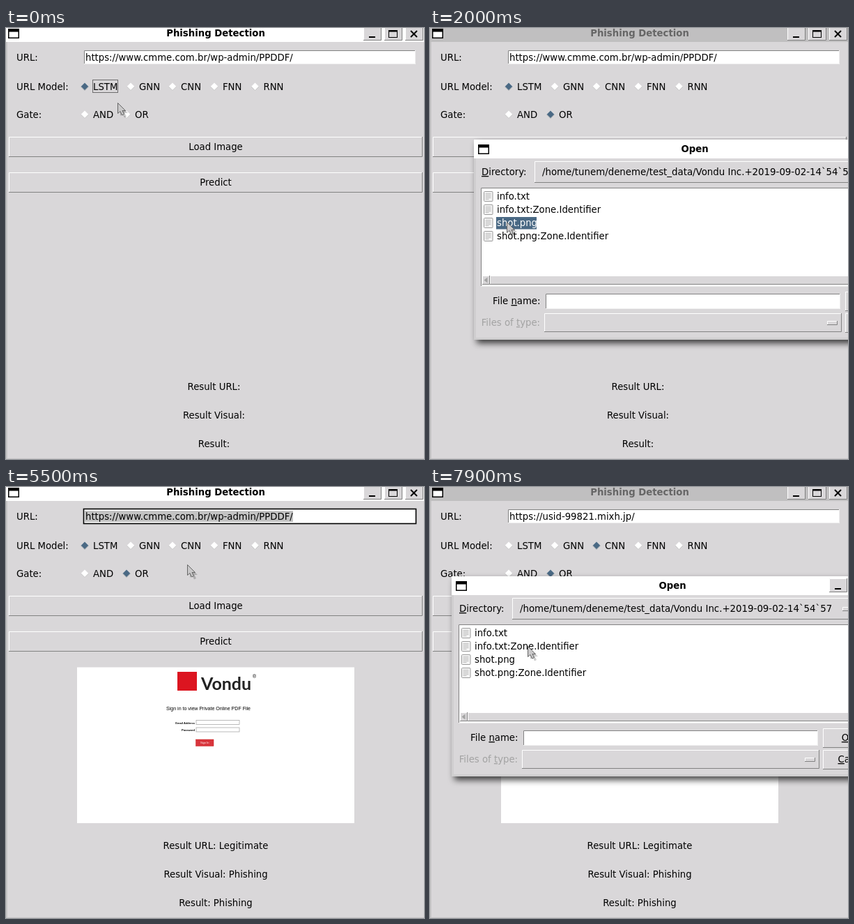
Recreate the animation shown at these times as an HTML page. Size 600x618 px, loop 8000 ms.

```html
<!DOCTYPE html>
<html lang="en">
<head>
<meta charset="utf-8">
<title>Phishing Detection</title>
<style>
  html, body { margin: 0; width: 100%; height: 100%; overflow: hidden; background: #d9d7d9; }
  #stage { display: block; width: 600px; height: 618px; }
  text { font: 13.25px "DejaVu Sans", sans-serif; fill: #000; white-space: pre; }
  .title { font-weight: bold; }
  .path { font-size: 13.35px; }
  .folder { font-size: 13.5px; }
  .mid { text-anchor: middle; }
  .end { text-anchor: end; }
  .u { text-decoration: underline; }
  .off { fill: #a3a3a3; }
  .shadow { filter: drop-shadow(4px 5px 5px #000b); }
  .page { font-family: "Liberation Sans", sans-serif; }
</style>
</head>
<body>
<svg id="stage" viewBox="0 0 600 618"></svg>
<script>
const LOOP = 8000, STEP = 100;
const GREY = '#d9d7d9', BLUE = '#4a6984';
const stage = document.getElementById('stage');
const timed = [];

function el(parent, tag, attrs = {}) {
  const node = document.createElementNS('http://www.w3.org/2000/svg', tag);
  for (const key in attrs) node.setAttribute(key, attrs[key]);
  return parent.appendChild(node);
}
const group = (p, attrs) => el(p, 'g', attrs);
const rect = (p, x, y, width, height, fill, more) =>
  el(p, 'rect', { x, y, width, height, fill, ...more });
const line = (p, d, stroke, width = 1) =>
  el(p, 'path', { d, stroke, 'stroke-width': width, fill: 'none' });

// "&" underlines the letter after it.
function text(p, x, y, str, cls = '', style = '') {
  const node = el(p, 'text', { x, y, class: cls, style });
  const at = str.indexOf('&');
  if (at < 0) {
    node.textContent = str;
  } else {
    node.append(str.slice(0, at));
    el(node, 'tspan', { class: 'u' }).textContent = str[at + 1];
    node.append(str.slice(at + 2));
  }
  return node;
}

// Shows a node only inside the given [from, to) spans.
function during(node, ...spans) {
  timed.push({ node, spans });
  return node;
}

function bevel(p, x, y, w, h, fill = GREY, sunken = false) {
  rect(p, x, y, w, h, fill);
  const [lit, dark] = sunken ? ['#828282', '#eee'] : ['#fff', '#828282'];
  line(p, `M${x + .5} ${y + h}V${y + .5}H${x + w}`, lit);
  line(p, `M${x} ${y + h - .5}H${x + w - .5}V${y}`, dark);
}

function windowIcon(p, x, y) {
  rect(p, x + .75, y + .75, 14.5, 12.5, '#fff', { stroke: '#000', 'stroke-width': 1.5 });
  rect(p, x, y, 16, 4.5, '#000');
}

function windowButtons(p, right, y) {
  for (let i = 0; i < 3; i++) bevel(p, right - 92 + i * 30, y, 26, 20);
  line(p, `M${right - 84} ${y + 15}h9`, '#000', 2);
  rect(p, right - 55.5, y + 5.5, 12, 10, 'none', { stroke: '#000' });
  line(p, `M${right - 55} ${y + 6.5}h11`, '#000', 2);
  line(p, `M${right - 24} ${y + 6}l9 9m0 -9l-9 9`, '#000', 2);
}

function diamond(p, x, y, fill) {
  el(p, 'path', { d: `M${x - 5.5} ${y}l5.5 -5.5 5.5 5.5 -5.5 5.5z`, fill });
  line(p, `M${x - 5.5} ${y}l5.5 5.5 5.5 -5.5`, '#bdbdbd', .8);
}

function radio(x, y, label, ...spans) {
  diamond(stage, x, y, '#fff');
  if (spans.length) diamond(during(group(stage), ...spans), x, y, BLUE);
  text(stage, x + 12, y + 5, label);
}

const ring = (x, y, w, ...spans) =>
  during(rect(stage, x + .5, y + .5, w, 18, 'none',
    { stroke: '#000', 'stroke-dasharray': '1 1' }), ...spans);

function wideButton(y, label, hover, press) {
  bevel(stage, 4, y, 594, 29);
  bevel(during(group(stage), ...hover), 4, y, 594, 29, '#ececec');
  if (press) bevel(during(group(stage), press), 4, y, 594, 29, '#ececec', true);
  text(stage, 301, y + 19, label, 'mid');
}

function mainWindow() {
  rect(stage, 0, 0, 600, 618, GREY);
  rect(stage, 0, 0, 2, 618, '#c6c5c6');
  rect(stage, 0, 617, 600, 1, '#c6c5c6');
  rect(stage, 0, 0, 600, 20, '#fff');
  text(stage, 301, 12, 'Phishing Detection', 'title mid');
  const idle = during(group(stage), [800, 2100], [7600, LOOP]);
  rect(idle, 0, 0, 600, 20, '#c0bfc0');
  text(idle, 301, 12, 'Phishing Detection', 'title mid', 'fill:#666');
  windowIcon(stage, 3, 1);
  windowButtons(stage, 605, -2);

  text(stage, 15, 47, 'URL:');
  bevel(stage, 112, 32, 476, 20, '#fff', true);
  during(rect(stage, 111.5, 31.5, 477, 21, '#fff',
    { stroke: '#000', 'stroke-width': 1.6 }), [4900, 6900]);
  during(rect(stage, 113, 34, 299, 16, '#c3c3c3'), [4900, 5900]);
  during(text(stage, 114, 47, 'https://www.cmme.com.br/wp-admin/PPDDF/'), [0, 5900]);
  during(text(stage, 114, 47, 'https://usid-99821.mixh.jp/'), [5900, LOOP]);
  during(rect(stage, 295.5, 34, 1.5, 16, '#000'), [5900, 6900]);

  text(stage, 15, 89, 'URL Model:');
  radio(113, 84, 'LSTM', [0, 6900]);
  radio(179, 84, 'GNN');
  radio(239, 84, 'CNN', [6900, LOOP]);
  radio(299, 84, 'FNN');
  radio(357.5, 84, 'RNN');
  text(stage, 15, 129, 'Gate:');
  radio(113, 124, 'AND');
  radio(173, 124, 'OR', [300, LOOP]);
  ring(124, 74, 36, [0, 300]);
  ring(183, 115, 22, [300, 800], [2100, 4900]);
  ring(250, 74, 30, [6900, 7600]);

  wideButton(156, 'Load Image', [[500, 800], [7300, 7600]]);
  wideButton(207, 'Predict', [[2300, 4800]], [2600, 3800]);

  const rows = [['Result URL:', ' Legitimate'], ['Result Visual:', ' Phishing'], ['Result:', ' Phishing']];
  rows.forEach(([label, value], i) => {
    const y = 519 + i * 41;
    during(text(stage, 298.5, y, label, 'mid'), [0, 3800]);
    during(text(stage, 301, y, label + value, 'mid'), [3800, LOOP]);
  });
}

function loadedPage() {
  const p = during(group(stage), [2100, LOOP]);
  const page = (x, y, str, size, more = '', cls = '') =>
    text(p, x, y, str, 'page ' + cls, `font-size:${size}px;${more}`);
  rect(p, 102, 258.5, 398, 223.5, '#fff');
  rect(p, 246, 265, 28, 27, '#dc1520');
  page(280, 291, 'Vondu', 25, 'font-family:Lato,sans-serif;font-weight:bold;fill:#222');
  page(354, 274, '®', 7);
  page(230, 320, 'Sign in to view Private Online PDF File', 7.05);
  page(271, 339.5, 'Email Address', 4, 'font-weight:bold', 'end');
  page(271, 350, 'Password', 4, 'font-weight:bold', 'end');
  for (const y of [334.5, 345]) rect(p, 273, y, 62, 6, '#fff', { stroke: '#aaa', 'stroke-width': .8 });
  rect(p, 272.5, 362, 25.5, 9.5, '#d8353c', { stroke: '#c22', 'stroke-width': .5 });
  page(285.2, 368.2, 'Sign In', 4, 'fill:#fff', 'mid');
}

function folderIcon(p, x, y) {
  el(p, 'path', { d: `M${x} ${y + 14}v-12h6l2 2h7v10z`, fill: '#7f9bb3', stroke: '#566675' });
  rect(p, x + 2.5, y + 6, 12, 8, '#9fb6c9', { stroke: '#566a7e', 'stroke-width': .8 });
}

function fileIcon(p, x, y) {
  rect(p, x + 1, y + .5, 12.5, 14, '#f4f4f4', { stroke: '#999', rx: 1 });
  for (let i = 0; i < 5; i++) line(p, `M${x + 3} ${y + 3.5 + i * 2}h${i === 4 ? 5 : 8}`, '#bbb');
}

function upIcon(p, x, y) {
  el(p, 'path', { d: `M${x} ${y + 18}v-16h7l2 3h10v13z`, fill: '#7f9096', stroke: '#59656a' });
  rect(p, x + 3, y + 8, 17, 10, '#a9b5b4', { stroke: '#59656a' });
  el(p, 'path', { d: `M${x + 12} ${y + 1}l7.5 8h-4v8h-7v-8h-4z`, fill: '#6fd43c', stroke: '#d6c04a' });
}

function dialog(x, y, w, pathEnd, items, thumb, ...spans) {
  const p = during(group(stage, { transform: `translate(${x} ${y})` }), ...spans);
  rect(p, 0, 0, w, 287, '#cfcecf', { class: 'shadow' });
  rect(p, 3, 27, w - 6, 257, GREY);
  rect(p, 0, 0, w, 27, '#fff');
  windowIcon(p, 6, 7);
  text(p, w / 2, 18, 'Open', 'title mid');
  windowButtons(p, w, 3);

  text(p, 11, 51, '&Directory:');
  bevel(p, 87, 31, w - 138, 31);
  const path = el(p, 'svg', { x: 98, y: 34, width: w - 185, height: 24 });
  text(path, 0, 17, '/home/tunem/deneme/test_data/' + pathEnd, 'path');
  bevel(p, w - 73, 44, 14, 6);
  bevel(p, w - 43, 31, 33, 31);
  upIcon(p, w - 37, 37);

  bevel(p, 10, 69, w - 20, 142, '#fff', true);
  const list = el(p, 'svg', { x: 11, y: 70, width: w - 23, height: 122 });
  items.forEach((name, i) => {
    const left = i < 6 ? 2.5 : 304, top = 4 + (i % 6) * 19;
    const isFile = /\.(png|txt)/.test(name);
    (isFile ? fileIcon : folderIcon)(list, left, top);
    text(list, left + 19.5, top + 12, name, isFile ? '' : 'folder');
  });

  rect(p, 12, 195, w - 25, 13, '#c3c3c3');
  const full = thumb > w - 60;
  for (const [bx, dir] of [[12, -1], [w - 24, 1]]) {
    bevel(p, bx, 195, 11, 13, full ? GREY : '#f0f0f0');
    el(p, 'path', { d: `M${bx + 5.5 + dir * 3} 201.5l${-dir * 5} -4v8z`, fill: full ? '#a3a3a3' : '#000' });
  }
  bevel(p, 23, 195, thumb, 13);

  text(p, 95.5, 236, 'File &name:', 'end');
  bevel(p, 103, 221, w - 211, 22, '#fff', true);
  text(p, 95, 267, 'Files of &type:', 'end off');
  bevel(p, 101, 249, w - 207, 27);
  bevel(p, w - 127, 260, 15, 6);
  bevel(p, w - 101, 218, 91, 28);
  text(p, w - 56.5, 236, '&Open', 'mid');
  bevel(p, w - 101, 249, 91, 28);
  text(p, w - 57, 267, '&Cancel', 'mid');
  return p;
}

function dialogs() {
  const folder = 'Vondu Inc.+2019-09-02-14`54`57';
  const inside = ['info.txt', 'info.txt:Zone.Identifier', 'shot.png', 'shot.png:Zone.Identifier'];
  const first = dialog(63, 160, 425, folder, [folder, 'Amazon.com Inc.+2020-05-23-18`44`35',
    'Netflix Inc.+2020-08-19-13`40`31', 'Spotify+2020-05-01-16`19`36',
    'archive.png', 'edevlet.png', 'sahibinden.png', 'yandex.png'], 254, [800, 1700]);
  const picked = during(group(first), [1300, 1700]);
  rect(picked, 32, 73, 236, 17.5, BLUE);
  text(picked, 33, 86, folder, 'folder', 'fill:#fff');

  const second = dialog(63, 160, 634, folder, inside, 587, [1700, 2100]);
  const shot = during(group(second), [1900, 2100]);
  rect(shot, 32, 111, 58, 17.5, BLUE);
  text(shot, 33, 124, 'shot.png', '', 'fill:#fff');

  dialog(31, 128, 634, folder, inside, 587, [7600, LOOP]);
}

function pointer() {
  const p = group(stage);
  const arrow = during(group(p), [0, 1400], [1700, 2800], [4600, LOOP]);
  const d = 'M.5 .5V15.5L4 12.5L6.5 18L9.5 16.5L7 11.5H11.5Z';
  el(arrow, 'path', { d, transform: 'translate(3.5 3.5)', fill: '#0003' });
  el(arrow, 'path', { d, fill: '#c9c8c9', stroke: '#666' });
  const watch = during(group(p), [1400, 1700]);
  rect(watch, 1, -3.5, 8, 15, '#000', { rx: 1.5 });
  el(watch, 'circle', { cx: 5, cy: 4, r: 5.5, fill: '#fff', stroke: '#000', 'stroke-width': 2 });
  line(watch, 'M5 .5V4H2', '#000', 1.5);
  rect(watch, 10.5, 3, 2.5, 2.5, '#000');
  return p;
}

// time, x, y
const route = [
  [0, 160, 107], [200, 172, 122], [300, 172, 122], [600, 200, 168], [800, 200, 168],
  [1200, 156, 236], [1700, 156, 236], [1900, 110, 278], [2100, 110, 278], [2400, 225, 222],
  [2800, 225, 222], [4600, 230, 215], [4900, 300, 42], [5100, 300, 42], [5500, 260, 111],
  [5900, 260, 111], [6400, 170, 97], [6600, 170, 97], [6900, 241, 84], [7100, 241, 84],
  [7400, 250, 166], [7600, 250, 166], [7900, 140, 228], [LOOP, 140, 228]
];

function place(t) {
  const i = route.findIndex(k => k[0] > t);
  const [t0, x0, y0] = route[i - 1], [t1, x1, y1] = route[i];
  const k = (t - t0) / (t1 - t0);
  return `translate(${x0 + (x1 - x0) * k} ${y0 + (y1 - y0) * k})`;
}

mainWindow();
loadedPage();
dialogs();
const cursor = pointer();

function draw(t) {
  for (const { node, spans } of timed) {
    const on = spans.some(([from, to]) => t >= from && t < to);
    node.style.display = on ? '' : 'none';
  }
  cursor.setAttribute('transform', place(t));
}

const start = performance.now();
function tick() {
  const t = (performance.now() - start) % LOOP;
  draw(Math.floor(t / STEP) * STEP);
  requestAnimationFrame(tick);
}
tick();
</script>
</body>
</html>
```
